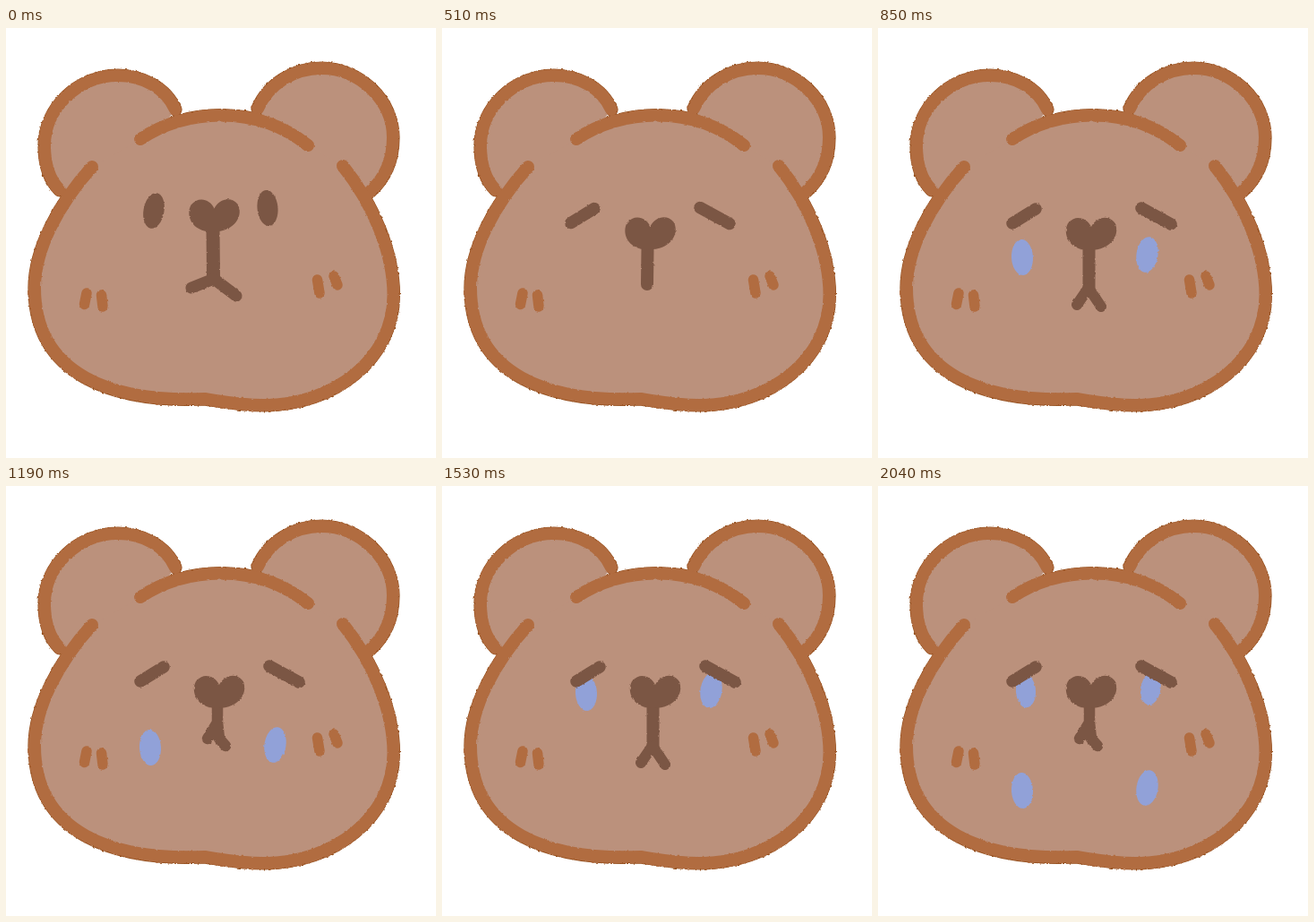
An HTML page that plays this animation: 480 px wide and 480 px high, repeating every 2.21 s.

```html
<!DOCTYPE html>
<html lang="en">
<head>
<meta charset="utf-8">
<title>Crying bear</title>
<style>
  html, body { margin: 0; width: 100%; height: 100%; overflow: hidden; background: #fff; }
  svg { display: block; width: 100vw; height: 100vh; }
  path { stroke-linecap: round; stroke-linejoin: round; }
</style>
</head>
<body>
<svg viewBox="0 0 480 480">
  <defs>
    <filter id="rough" filterUnits="userSpaceOnUse" x="0" y="0" width="480" height="480" color-interpolation-filters="sRGB">
      <feTurbulence type="fractalNoise" baseFrequency="0.3" numOctaves="2" seed="4"/>
      <feDisplacementMap in="SourceGraphic" scale="2.5" xChannelSelector="R" yChannelSelector="G"/>
    </filter>
    <filter id="soft" filterUnits="userSpaceOnUse" x="0" y="0" width="480" height="480" color-interpolation-filters="sRGB">
      <feTurbulence type="fractalNoise" baseFrequency="0.3" numOctaves="2" seed="9"/>
      <feDisplacementMap in="SourceGraphic" scale="2.5" xChannelSelector="R" yChannelSelector="G"/>
      <feGaussianBlur stdDeviation="0.7"/>
    </filter>
  </defs>
  <g id="head" filter="url(#rough)"></g>
  <g id="marks" filter="url(#soft)"></g>
  <g id="face" filter="url(#soft)"></g>
</svg>
<script>
const FUR = '#bb917c', EDGE = '#b16c40', RIM = '#95501f', DARK = '#7b5644', TEAR = '#91a1d8';
const STEP = 170;
const $ = id => document.getElementById(id);

const fill = (d, color) => `<path d="${d}" fill="${color}"/>`;
const line = (d, color, w) => `<path d="${d}" fill="none" stroke="${color}" stroke-width="${w}"/>`;
const oval = (x, y, rx, ry, turn, color) =>
  `<ellipse rx="${rx}" ry="${ry}" fill="${color}" transform="translate(${x} ${y}) rotate(${turn})"/>`;
const shift = (x, y, body) => `<g transform="translate(${x} ${y})">${body}</g>`;

// Head: each outline runs through a few turning points
const leftEar = 'M189,91C178,66 151,53 125,53C80,53 43,90 43,131C43,152 48,169 60,181';
const rightEar = 'M281,90C293,62 322,45 352,45C396,45 432,82 432,122C432,146 424,167 406,183';
const cheeks = 'M96,155C60,195 32,246 32,290C32,388 120,418 222,414C242,417 262,421 288,421' +
  'C366,421 432.5,370 432.5,298C432.5,252 410,196 376,154';
const crown = 'M337,131C280,85 200,90 150,124';
const outlines = [leftEar, rightEar, cheeks, crown];

$('head').innerHTML =
  outlines.map(d => line(d, RIM, 15.2)).join('') +
  fill(leftEar + 'L130,170Z', FUR) + fill(rightEar + 'L340,170Z', FUR) +
  fill(cheeks + crown.replace('M', 'L') + 'Z', FUR);

$('marks').innerHTML =
  outlines.map(d => line(d, EDGE, 14)).join('') +
  line('M90,296L87.5,308.5M106.5,298L108,311M347.5,281L350,296M366,277L370,287', EDGE, 11.5);

// Face parts
const heart = fill('M238,222C243,211 257,208 264,217C271,229 262,248 236,248' +
  'C212,248 206,229 212,218C220,208 233,211 238,222Z', DARK);
const eyes = oval(165, 204, 11.5, 20, 10, DARK) + oval(292, 201, 11.5, 20, -5, DARK);
const brows = line('M150,218L176,202M294,201L327,219', DARK, 13.5);
const calm = line('M231,224L231.5,280', DARK, 15) + line('M207,290L232,280L257,299', DARK, 13);
const shut = line('M229.5,246L229,286', DARK, 14);
const long = line('M235.5,244V292', DARK, 14) + line('M222,309L235,290L249,311', DARK, 12);
const short = line('M236,244V264L225,282M236,264L238,282L245,290', DARK, 12.5);
const tears = (y, size = 1) =>
  oval(161, y, 12 * size, 20 * size, -3, TEAR) + oval(300.5, y - 3, 12 * size, 20 * size, 9, TEAR);

// The mouth tightens as a tear falls; a smaller pair wells up once it is low
const sob = y =>
  tears(y) + (y > 300 ? shift(4, 0, tears(229, 0.92)) : '') + brows + (y < 260 ? long : short) + heart;

const rest = eyes + calm + shift(-5.5, -20.5, heart);
const pout = eyes + shut + shift(-5.5, -0.5, heart);
const wince = shift(-6, -0.5, brows) + shut + shift(-5.5, -0.5, heart);

const slowFall = [231, 256, 270, 292, 340];
const fastFall = slowFall.filter(y => y !== 292);
const poses = [rest, pout, pout, wince, ...[...slowFall, ...fastFall].map(sob)];

const start = performance.now();
let shown;
function draw(now) {
  const time = Math.max(0, now - start);
  const pose = poses[Math.floor(time / STEP) % poses.length];
  if (pose !== shown) $('face').innerHTML = shown = pose;
  requestAnimationFrame(draw);
}
draw(start);
</script>
</body>
</html>
```
